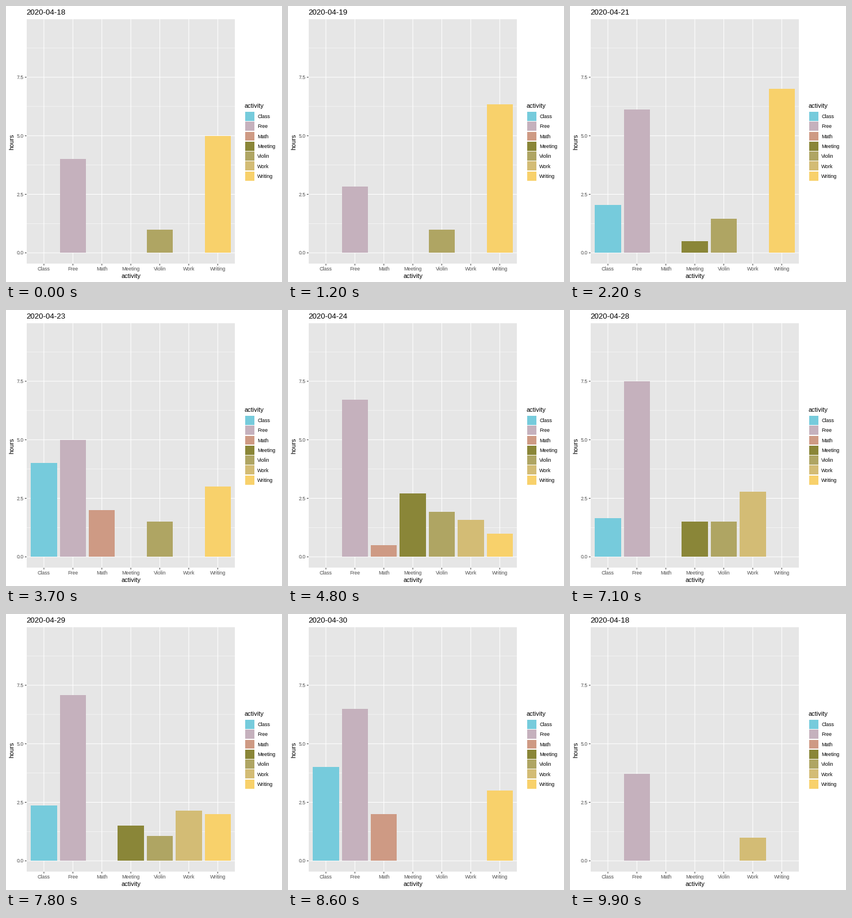
A matplotlib script for the animation above (10 s loop, 480 px wide and 480 px high).

```python
import math

import matplotlib.pyplot as plt
from matplotlib.animation import FuncAnimation
from matplotlib.patches import Rectangle

SIZE, DPI = 480, 80
FRAMES, INTERVAL = 100, 100
PT = 72 / DPI  # points per pixel

LEFT, RIGHT, TOP, BOTTOM = 35.6, 398.4, 23, 448.4
ZERO, HOUR = 429.3, 40.72
FIRST_X, STEP_X, BAR_W = 65.95, 50.38, 45.34
GREY = "#4d4d4d"

COLORS = {
    "Class": "#76cbdc",
    "Free": "#c5b1bd",
    "Math": "#ce9a84",
    "Meeting": "#8a8638",
    "Violin": "#afa563",
    "Work": "#d3bc75",
    "Writing": "#f8d16b",
}

# Hours per day, in the order of COLORS; 0 means no bar.
DAYS = [
    (0, 4, 0, 0, 1, 0, 5),
    (0, 3, 0, 0, 1, 0, 6),
    (2.5, 2.5, 0, 0.5, 1, 0, 7),
    (2, 6.5, 0, 0.5, 1.5, 0, 0),
    (2.5, 6, 1, 0, 1, 0, 4),
    (4, 5, 2, 0, 1.5, 0, 3),
    (0, 6.5, 0.5, 3, 2, 1.5, 1),
    (0, 8, 0, 1, 1.5, 2, 0),
    (0, 9.5, 0, 0, 1, 1, 1),
    (2.5, 7.5, 0, 1.5, 1.5, 1.5, 0),
    (1.5, 7.5, 0, 1.5, 1.5, 3, 2),
    (2.5, 7, 1, 0, 1, 2, 2),
    (4, 6.5, 2, 0, 0, 0, 3),
    (0, 2, 0, 0, 0, 1, 0),
]
DATES = [f"2020-04-{d}" for d in range(18, 31)] + ["2020-05-01"]

# Last still frame of each day and the length of the move that follows.
LEAVE = [2, 10, 18] + [26 + 7 * i for i in range(11)]
MOVE = [5] * 3 + [4] * 11

plt.rcParams["font.family"] = "Liberation Sans"
fig = plt.figure(figsize=(SIZE / DPI, SIZE / DPI), dpi=DPI, facecolor="white")
ax = fig.add_axes([0, 0, 1, 1])
ax.set_xlim(0, SIZE)
ax.set_ylim(SIZE, 0)
ax.axis("off")


def box(x0, y0, x1, y1, color, z):
    patch = Rectangle((x0, y0), x1 - x0, y1 - y0, facecolor=color,
                      linewidth=0, antialiased=False, zorder=z)
    return ax.add_patch(patch)


def line(x, y, color, width, z):
    ax.plot(x, y, color=color, lw=width * PT, solid_capstyle="butt",
            snap=False, zorder=z)


def label(x, y, text, px, color="black", ha="left", angle=0):
    return ax.text(x, y, text, fontsize=px * PT, color=color, ha=ha,
                   va="baseline", rotation=angle, rotation_mode="anchor")


def height(hours):
    return ZERO - HOUR * hours


def draw_axes():
    box(LEFT, TOP, RIGHT, BOTTOM, "#e6e6e6", 0)
    for hours in (1.25, 3.75, 6.25, 8.75):
        line((LEFT, RIGHT), [height(hours)] * 2, "white", 0.53, 1)
    for hours in (0, 2.5, 5, 7.5):
        y = height(hours)
        line((LEFT, RIGHT), (y, y), "white", 1.07, 2)
        line((LEFT - 2.75, LEFT), (y, y), "#333333", 1.07, 2)
        label(30.6, y + 3.1, f"{hours:.1f}", 8.8, GREY, "right")
    for i, name in enumerate(COLORS):
        x = FIRST_X + i * STEP_X
        line((x, x), (TOP, BOTTOM), "white", 1.07, 2)
        line((x, x), (BOTTOM, BOTTOM + 2.75), "#333333", 1.07, 2)
        label(x, 460, name, 8.8, GREY, "center")
    label(217, 473, "activity", 11, ha="center")
    label(13.5, 236, "hours", 11, ha="center", angle=90)


def draw_legend():
    label(414.8, 177, "activity", 11)
    for i, (name, color) in enumerate(COLORS.items()):
        y = 183.3 + 17.28 * i
        box(416, y + 0.7, 432, y + 16.6, color, 3)
        label(437.3, y + 11.8, name, 8.8)


draw_axes()
draw_legend()
title = label(35.3, 15, "", 13.2)
bars = []
for i, color in enumerate(COLORS.values()):
    mid = FIRST_X + i * STEP_X
    bars.append(box(mid - BAR_W / 2, ZERO, mid + BAR_W / 2, ZERO, color, 3))


def locate(frame):
    """Day index and the progress of its move towards the next day."""
    for day, (leave, move) in enumerate(zip(LEAVE, MOVE)):
        if frame < leave + move:
            return day, max(0, frame - leave) / move
    return 0, 0


def update(frame):
    day, t = locate(frame)
    after = (day + 1) % len(DAYS)
    ease = (1 - math.cos(math.pi * t)) / 2
    for bar, a, b in zip(bars, DAYS[day], DAYS[after]):
        # Bars enter and leave only once the move has ended.
        hours = a + (b - a) * ease if a and b else a
        bar.set_y(height(hours))
        bar.set_height(HOUR * hours)
        bar.set_visible(hours > 0)
    title.set_text(DATES[after if t >= 0.5 else day])
    return bars + [title]


anim = FuncAnimation(fig, update, frames=FRAMES, interval=INTERVAL,
                     repeat=True, repeat_delay=0, blit=False)
plt.show()
```
